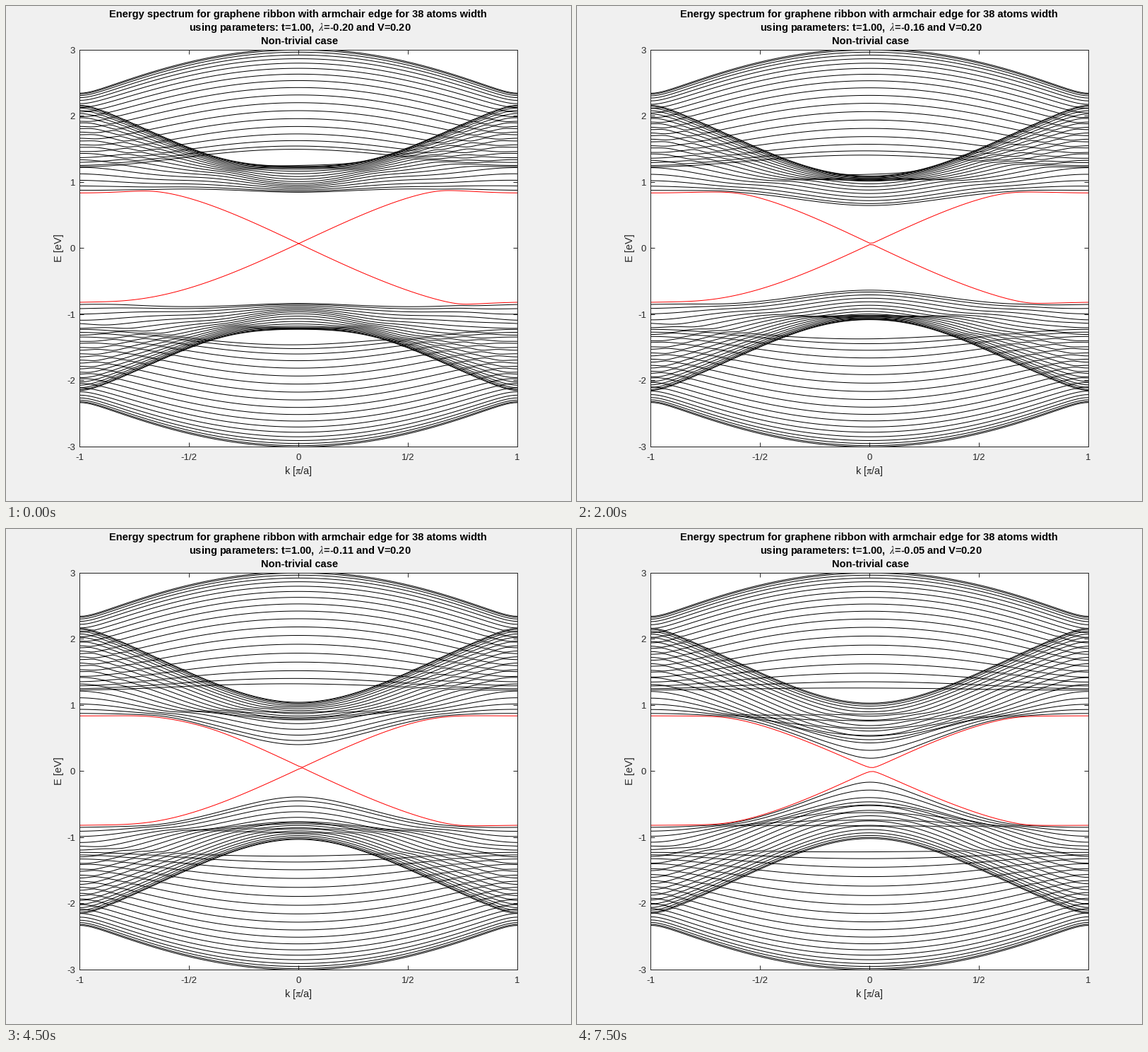
Recreate the animation shown at these times as a matplotlib script. Size 800 by 700 pixels, loop 8 s.

```python
import numpy as np
import matplotlib.pyplot as plt
from matplotlib.animation import FuncAnimation

plt.rcParams["font.family"] = "Liberation Sans"
plt.rcParams["mathtext.fontset"] = "stix"

W, H, DPI = 800, 700, 100
# just inside the pixel centres, so that the frame snaps to whole pixels
LEFT, RIGHT, TOP, BOTTOM = 104.49, 724.49, 61.51, 622.51
FRAMES, INTERVAL = 16, 500
N, T, V = 38, 1.0, 0.2
GREY = "#262626"
PT = 72 / DPI


def ribbon():
    """Hopping, spin-orbit and on-site matrices by cell offset."""
    line = np.repeat(np.arange(N), 2)
    sub = np.tile([0, 1], N)
    x = sub + 1.5 * (line % 2)
    y = line * np.sqrt(3) / 2
    sign = 1 - 2 * sub
    hop, orbit = {}, {}
    for cell in (-1, 0, 1):
        dx = x[None, :] + 3 * cell - x[:, None]
        dy = y[None, :] - y[:, None]
        dist = np.hypot(dx, dy)
        hop[cell] = T * (abs(dist - 1) < 1e-6)
        turn = np.round(np.sin(3 * np.arctan2(dy, dx)))
        orbit[cell] = 1j * sign[:, None] * turn * (abs(dist - np.sqrt(3)) < 1e-6)
    # the potential alternates along one zigzag chain, up to its last atom
    chain = (sub == line % 2) & (line < N - 1)
    site = np.diag(2 * V * sign * chain)
    return hop, orbit, site


HOP, ORBIT, SITE = ribbon()
K = np.linspace(-1, 1, 121)
PHASE = np.exp(1j * np.pi * K)[:, None, None]
cache = {}


def bands(lam):
    if lam not in cache:
        m = {c: HOP[c] + lam * ORBIT[c] for c in HOP}
        ham = m[0] + SITE + m[1] * PHASE + m[-1] / PHASE
        cache[lam] = np.linalg.eigvalsh(ham)
    return cache[lam]


fig = plt.figure(figsize=(W / DPI, H / DPI), dpi=DPI, facecolor="#f0f0f0")
ax = fig.add_axes([LEFT / W, 1 - BOTTOM / H, (RIGHT - LEFT) / W, (BOTTOM - TOP) / H])
ax.set(xlim=(-1, 1), ylim=(-3, 3), xticks=np.linspace(-1, 1, 5), yticks=range(-3, 4))
ax.tick_params(direction="in", top=True, right=True, length=6 * PT, width=PT,
               color=GREY, labelbottom=False, labelleft=False)
for spine in ax.spines.values():
    spine.set(color=GREY, linewidth=PT)


def label(x, y, s, px, color=GREY, **kw):
    kw = {"ha": "center", "va": "baseline", **kw}
    return fig.text(x / W, 1 - y / H, s, fontsize=px * PT, color=color, **kw)


for i, s in enumerate(["-1", "-1/2", "0", "1/2", "1"]):
    label(LEFT - 0.5 + 155 * i, 642, s, 13.3)
for e in range(-3, 4):
    label(98, 347.3 - 93.5 * e, str(e), 13.3, ha="right")
label(413.5, 662, r"k [$\mathrm{\pi}$/a]", 14.67)
label(74.5, 342, "E [eV]", 14.67, rotation=90, va="center")

label(413, 16, f"Energy spectrum for graphene ribbon with armchair edge for {N} atoms width",
      14.67, "black", weight="bold")
params = label(416, 35, "", 14.67, "black", weight="bold")
label(415.5, 54, "Non-trivial case", 14.67, "black", weight="bold")

lines = [ax.plot(K, 0 * K, color="red" if i in (N - 1, N) else "black", lw=PT)[0]
         for i in range(2 * N)]


def draw(i):
    lam = round(-0.2 + 0.01 * i, 2)
    params.set_text(rf"using parameters: t={T:.2f}, $\;\lambda$={lam:.2f} and V={V:.2f}")
    for ln, e in zip(lines, bands(lam).T):
        ln.set_ydata(e)
    return [*lines, params]


anim = FuncAnimation(fig, draw, frames=FRAMES, interval=INTERVAL, repeat=True, repeat_delay=0)
plt.show()
```
